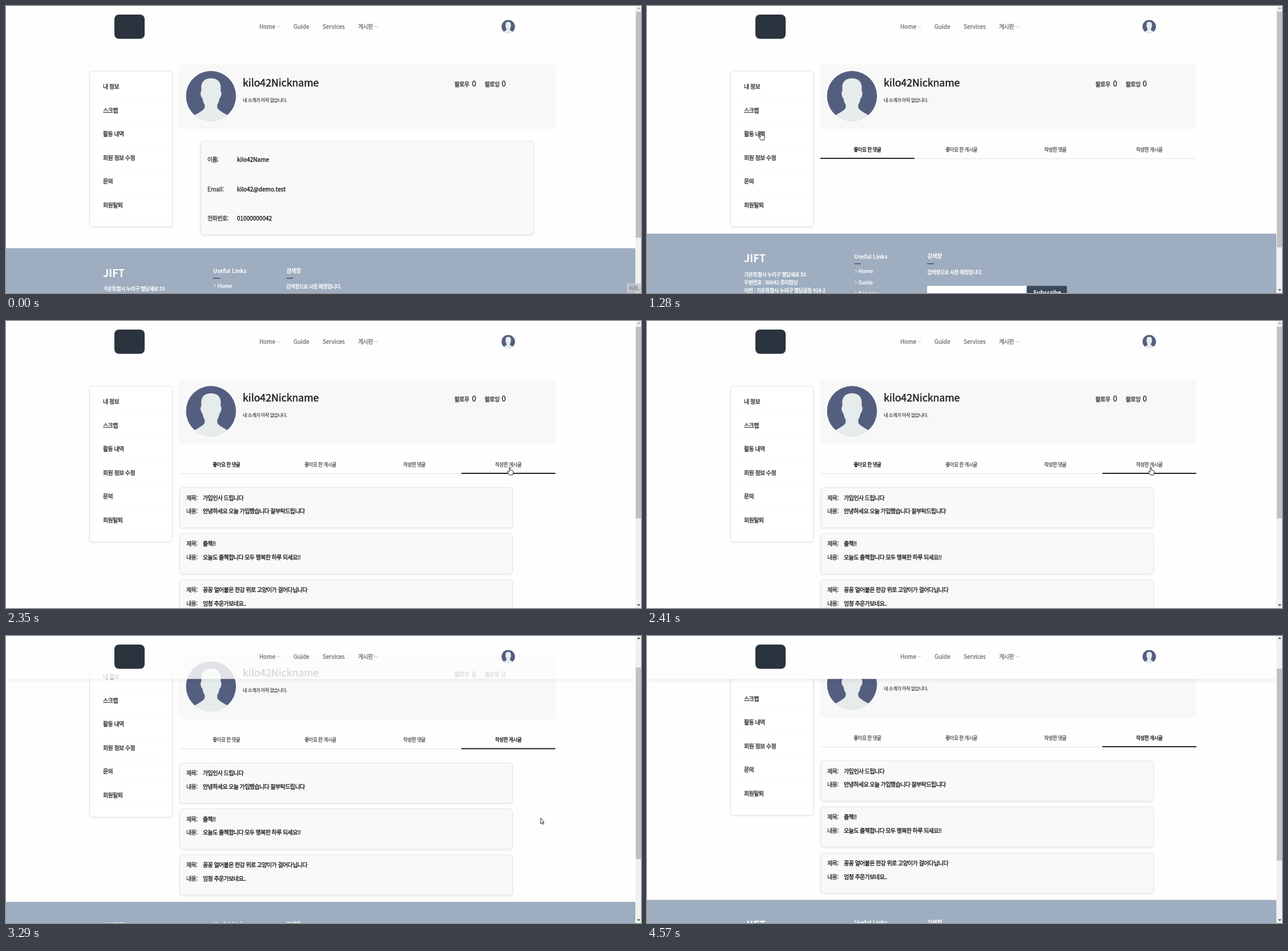
Write an HTML page that moves like this. It is 1113 px wide and 503 px high and loops after 4850 ms.

```html
<!DOCTYPE html>
<html lang="ko">
<head>
<meta charset="utf-8">
<title>내 정보</title>
<style>
  html, body { margin: 0; width: 100%; height: 100%; overflow: hidden; background: #fefefe; }
  svg { display: block; width: 1113px; height: 503px; }
  text {
    font-family: "Noto Sans CJK KR", "Noto Sans CJK JP", sans-serif;
    fill: currentColor; stroke: currentColor; stroke-width: .03em; white-space: pre;
  }
  .ko { letter-spacing: -.06em; }
  .bold { font-weight: 700; stroke: none; }
  .card { filter: drop-shadow(0 1.5px 1.5px rgba(0, 0, 0, .08)); }
  .soft { filter: drop-shadow(0 1px 2px rgba(0, 0, 0, .05)); }
  .bar { filter: drop-shadow(0 1px 4px rgba(0, 0, 0, .1)); }
</style>
</head>
<body>
<svg id="stage" viewBox="0 0 1113 503"></svg>
<script>
const LOOP = 4850;
const SHOW_TABS = 1210, SHOW_POSTS = 2350;
const INK = '#212529', GREY = '#6c737b', NAVY = '#545f80', PALE = '#e6ecec';
const TAB_W = 164.7;

const text = (x, y, str, { size = 10, color = INK, bold = false, anchor = 'start', id = '' } = {}) => {
  const cls = (/[가-힣]/.test(str) ? 'ko' : '') + (bold ? ' bold' : '');
  return `<text ${id && `id="${id}"`} x="${x}" y="${y}" class="${cls}" font-size="${size}" ` +
    `text-anchor="${anchor}" style="color:${color}">${str}</text>`;
};
const rect = (x, y, w, h, fill, extra = '') =>
  `<rect x="${x}" y="${y}" width="${w}" height="${h}" fill="${fill}" ${extra}/>`;
const card = (x, y, w, h, fill, line) =>
  rect(x + .5, y + .5, w - 1, h - 1, fill, `rx="4.5" stroke="${line}" class="card"`);
const path = (d, stroke, width = 1) =>
  `<path d="${d}" fill="none" stroke="${stroke}" stroke-width="${width}"/>`;
const group = (id, body) => `<g id="${id}">${body}</g>`;

// Default user picture, drawn in a circle of radius 44
const avatar = (x, y, scale) => `
  <g transform="translate(${x} ${y}) scale(${scale})" clip-path="url(#round)">
    <circle r="44" fill="${NAVY}"/>
    <path fill="${PALE}" d="M-17-13C-18-25-11-31 0-31S18-25 17-13V-8Q19-7 18-2Q17 3 15 4
      Q14 11 11 15V20Q12 25 29 33.5V46H-29V33.5Q-12 25-11 20V15Q-14 11-15 4Q-17 3-18-2Q-19-7-17-8Z"/>
  </g>`;

const navBar = () => {
  const item = (x, str) => text(x, 39.6, str, { color: GREY });
  const chevron = x => path(`M${x} 34.8l3 3 3-3`, '#a3a9b0', .8);
  return rect(190, 15, 53, 42.5, '#2b333f', 'rx="8"') +
    item(444, 'Home') + chevron(474.3) + item(504, 'Guide') + item(555, 'Services') +
    item(617, '게시판') + chevron(646.3) + avatar(880.3, 36.2, .27);
};

const sideMenu = () => card(146, 113.5, 146, 274, '#fff', '#dfe2e6') +
  ['내 정보', '스크랩', '활동 내역', '회원 정보 수정', '문의', '회원탈퇴'].map((label, i) =>
    text(170, 145 + i * 41.5, label) +
    rect(158, 162 + i * 41.5, 122, 1, '#f8f8f9')).join('');

const profile = () => rect(304, 102, 658, 111, '#f8f8f8', 'rx="6" class="soft"') +
  avatar(359.3, 157.8, 1) +
  text(415, 141, 'kilo42Nickname', { size: 17.7 }) +
  text(415, 167.6, '내 소개가 아직 없습니다.', { size: 8.2, color: '#444' }) +
  text(786, 140.8, '팔로우') + text(817, 141.3, '0', { size: 12.5 }) +
  text(839, 140.8, '팔로잉') + text(869, 141.3, '0', { size: 12.5 });

const info = () => card(340.5, 236.5, 584.5, 165, '#f8f9fb', '#dcdfe6') +
  [['이름:', 'kilo42Name'], ['Email:', 'kilo42@demo.test'], ['전화번호:', '01000000042']]
    .map(([key, value], i) =>
      text(353, 273.2 + i * 51.5, key, { color: '#333' }) +
      text(405, 273.2 + i * 51.5, value, { color: '#111' })).join('');

const tabs = () => rect(304, 267, 658.5, 1, '#dee2e6') +
  ['좋아요 한 댓글', '좋아요 한 게시글', '작성한 댓글', '작성한 게시글'].map((label, i) =>
    text(386.2 + i * TAB_W, 254.8, label, { size: 8.6, anchor: 'middle', color: '#555', id: 'tab' + i })).join('') +
  rect(304, 266, TAB_W, 2, INK, 'id="underline"');

const posts = () => [
  ['가입인사 드립니다', '안녕하세요 오늘 가입했습니다 잘부탁드립니다'],
  ['출첵!!', '오늘도 출첵합니다 모두 행복한 하루 되세요!!'],
  ['꽁꽁 얼어붙은 한강 위로 고양이가 걸어다닙니다', '엄청 추운가보네요..']
].map(([title, body], i) => {
  const y = 291.5 + i * 80.6;
  return card(304, y, 584, 71.5, '#f8fafa', '#dfe5e8') +
    text(316, y + 22.3, '제목:', { color: '#333' }) + text(345, y + 22.3, title, { color: '#111' }) +
    text(316, y + 45.8, '내용:', { color: '#333' }) + text(345, y + 45.8, body, { color: '#111' });
}).join('');

const footer = () => {
  const white = (x, y, str, size = 10) => text(x, y, str, { size, color: '#fff', bold: true });
  const dash = x => rect(x, 52, 12, 1.4, '#3d4b6b');
  const link = (y, str) => path(`M364.5 ${y - 6.5}l3 3-3 3`, '#fff', .9) +
    text(370.5, y, str, { size: 9.2, color: '#fff' });
  return rect(0, 0, 1103, 520, '#9eadbf') +
    white(170, 50.3, 'JIFT', 18) +
    ['가온특별시 누리구 별담새로 53', '우편번호 : 00042 루미빌딩', '지번 : 가온특별시 누리구 별담골동 918-2']
      .map((line, i) => white(170, 74.8 + i * 14, line, 9)).join('') +
    white(363, 43.5, 'Useful Links', 9.7) + dash(363) +
    link(69, 'Home') + link(88.6, 'Guide') + link(108.2, 'Services') +
    white(491, 43.3, '검색창') + dash(491) +
    white(491, 70.8, '검색창으로 사용 예정입니다.', 8.8) +
    rect(491, 91.5, 176, 24, '#fff', 'rx="2"') + rect(665.5, 91.5, 70.5, 24, '#3a4757', 'rx="2"') +
    white(677, 106.5, 'Subscribe');
};

const scrollbar = () => rect(1103, 0, 10, 503, '#f1f1f1') +
  rect(1104, 10, 9, 396, '#c1c1c1', 'id="thumb"') +
  '<path id="up" d="M1106 5.3h6l-3-3.2z" fill="#a3a3a3"/><path d="M1106 496.5h6l-3 3.2z" fill="#505050"/>';

const cursor = () => `<g id="cursor" fill="#fff" stroke="#111" stroke-width=".9" stroke-linejoin="round">
  <path id="arrow" d="M0 0V10L2.3 8 3.7 11 5.2 10.3 3.9 7.3H6.3Z"/>
  <path id="hand" d="M-1 1Q-1 0 0 0T1 1V5.2L5.2 6.3Q6.5 6.7 6.3 8L5.6 12 4.8 14H-.5L-4.4 8.8
    Q-4.9 7.5-3.8 7.2T-1 9Z"/></g>`;

const stage = document.getElementById('stage');
stage.innerHTML = '<clipPath id="round"><circle r="44"/></clipPath>' +
  rect(0, 0, 1113, 503, '#fefefe') +
  group('page', sideMenu() + profile() + group('info', info()) + group('tabs', tabs()) +
    group('posts', posts()) + group('footer', footer())) +
  rect(0, -10, 1103, 85.3, '#fefefe', 'id="navBack" class="bar"') + navBar() + scrollbar() +
  group('badge', rect(1088, 486, 25, 17, '#c4c9cf', 'opacity=".8"') +
    text(1092, 498, '녹화', { size: 9, color: '#858a90' })) +
  cursor();

const el = {};
stage.querySelectorAll('[id]').forEach(node => { el[node.id] = node; });

// Rows are [time, value, value...], joined by straight lines
const track = (rows, t) => {
  const i = rows.findIndex(row => row[0] > t);
  if (i === 0) return rows[0].slice(1);
  if (i < 0) return rows[rows.length - 1].slice(1);
  const a = rows[i - 1], b = rows[i], k = (t - a[0]) / (b[0] - a[0]);
  return a.slice(1).map((v, n) => v + (b[n + 1] - v) * k);
};
const unit = v => Math.min(1, Math.max(0, v));
const show = (node, on) => { node.style.display = on ? '' : 'none'; };

const POINTER = [
  [70, 1098, 491], [330, 700, 345], [590, 224, 213], [660, 219, 213], [730, 212.5, 216.5],
  [1010, 200, 221], [1470, 200, 221], [1600, 420, 288], [1740, 700, 305], [1870, 868, 290],
  [1940, 893, 268], [2010, 885, 258], [2140, 883, 256], [2810, 883, 256], [3080, 937, 319],
  [3360, 937, 319], [3830, 1062, 382], [4360, 1095, 489], [4540, 1098, 492]
];
const SCROLL = [[3130, 0], [3140, 1], [3165, 1], [3210, 30], [3290, 69.5], [3360, 72.5], [3430, 73]];

function draw(t) {
  const tabbed = t >= SHOW_TABS, listed = t >= SHOW_POSTS;
  const [scroll] = track(SCROLL, t);
  const [x, y] = track(POINTER, t);

  show(el.info, !tabbed);
  show(el.tabs, tabbed);
  show(el.posts, listed);
  el.footer.setAttribute('transform', `translate(0 ${listed ? 535.5 : tabbed ? 399 : 424.5})`);
  el.page.setAttribute('transform', `translate(0 ${-scroll})`);

  el.underline.setAttribute('x', 304 + (listed ? 3 * TAB_W : 0));
  const swap = unit((t - 2420) / 130);
  const shade = k => { const v = 85 - 70 * k; return `rgb(${v},${v},${v})`; };
  el.tab0.style.color = shade(1 - swap);
  el.tab3.style.color = shade(swap);

  el.navBack.style.opacity = 1 - (1 - unit((t - 3150) / 240)) ** 2;
  el.thumb.setAttribute('y', 10 + scroll * .65);
  el.thumb.setAttribute('height', listed ? 336 : tabbed ? 413 : 396);
  el.up.setAttribute('fill', scroll > 0 ? '#505050' : '#a3a3a3');

  const hand = (t >= 660 && t < 1500) || (t >= 1960 && t < 2830);
  show(el.badge, t < 70);
  show(el.cursor, t >= 70 && t < 4540);
  show(el.hand, hand);
  show(el.arrow, !hand);
  el.cursor.setAttribute('transform', `translate(${x} ${y})`);
}

const start = performance.now();
function tick() {
  draw((performance.now() - start) % LOOP);
  requestAnimationFrame(tick);
}
tick();
</script>
</body>
</html>
```
